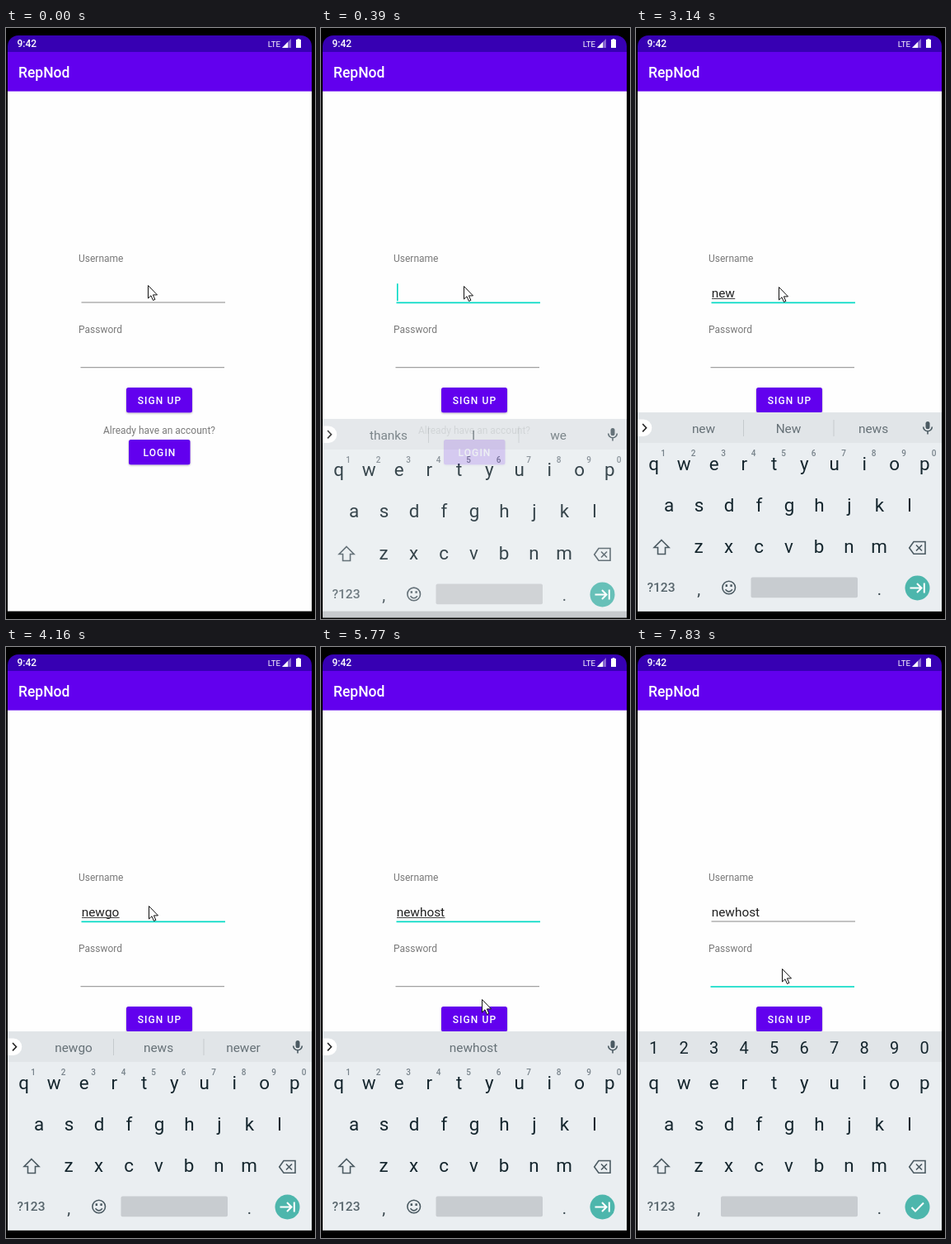
These frames come from a looping animation (375x715 px, 8 s). An HTML page:

```html
<!DOCTYPE html>
<html lang="en">
<head>
<meta charset="utf-8">
<title>Sign-up form</title>
<style>
  html, body { margin: 0; width: 100%; height: 100%; overflow: hidden; background: #000; }
  svg { display: block; width: 375px; height: 715px; font-family: Roboto, sans-serif; }
  .label { font-size: 12px; fill: #7a7a7a; }
  .button { font-size: 12px; font-weight: 500; letter-spacing: 1.1px; fill: #fff; }
  .field, .words { font-size: 15.4px; }
  .field { fill: #212121; }
  .words { fill: #667177; text-anchor: middle; }
  .key { font-size: 22.4px; fill: #15262e; text-anchor: middle; }
  .digit { font-size: 20px; }
  .mark { font-size: 20px; fill: #36454c; }
  .hint { font-size: 10px; font-weight: 500; fill: #77828a; text-anchor: middle; }
  .icon { fill: none; stroke: #4b5a62; stroke-width: 1.6; }
  .white { stroke: #fff; stroke-width: 2; }
</style>
</head>
<body>
<svg viewBox="0 0 375 715">
  <defs>
    <clipPath id="display"><rect x="2" y="9" width="369" height="705"/></clipPath>
    <filter id="shadow" x="-10%" y="-20%" width="120%" height="150%">
      <feDropShadow dx="0" dy="1" stdDeviation="1" flood-opacity=".3"/>
    </filter>
  </defs>

  <rect width="375" height="715"/>
  <rect x="2" y="40" width="369" height="665.6" fill="#fefefe"/>
  <path d="M2 30V22A13 13 0 0 1 15 9H358A13 13 0 0 1 371 22V30Z" fill="#3700b3"/>
  <rect x="2" y="29" width="369" height="47.6" fill="#6200ee"/>
  <g fill="#fff">
    <text x="13.5" y="23" font-size="12" font-weight="500">9:42</text>
    <text x="317.8" y="22.8" font-size="9.8">LTE</text>
    <path d="M346 13V24H335Z" opacity=".4"/>
    <path d="M342 17V24H335Z"/>
    <path d="M352 14H353.7V13H356.3V14H358V24H352Z"/>
    <text x="15" y="60" font-size="17.5" font-weight="500">RepNod</text>
  </g>

  <text class="label" x="88" y="282.7">Username</text>
  <text class="label" x="88" y="369.2">Password</text>
  <text class="label" x="118" y="490.5">Already have an account?</text>
  <g fill="#6200ee" filter="url(#shadow)">
    <rect x="146" y="435" width="80" height="30.3" rx="2.5"/>
    <rect x="149" y="498" width="74.5" height="30.3" rx="2.5"/>
  </g>
  <text class="button" x="159.7" y="454.6">SIGN UP</text>
  <text class="button" x="166.5" y="517.8">LOGIN</text>

  <rect id="userLine" x="91.5" width="174.5"/>
  <rect id="passLine" x="90.5" width="174.5"/>
  <text id="entry" class="field" x="91.7" y="326"></text>
  <rect id="composing" x="92" y="327" height="1" fill="#444"/>
  <rect id="caret" width="1.6" height="21" fill="#03dac5"/>

  <g clip-path="url(#display)">
    <g id="keyboard">
      <rect x="2" y="465" width="369" height="240.6" fill="#eaeef1"/>
      <rect x="2" y="465" width="369" height="37" fill="#e1e5e8"/>
      <g id="suggestions">
        <path d="M2 473.5H9A10.2 10.2 0 0 1 9 494H2Z" fill="#fff"/>
        <path class="icon" d="M8 479L12.5 483.7L8 488.4" style="stroke:#222"/>
        <path id="dividers" d="M130.5 474V494M240 474V494" stroke="#c5cacd"/>
        <text class="words" x="82" y="490"></text>
        <text class="words" x="185" y="490"></text>
        <text class="words" x="288" y="490"></text>
        <rect x="351.5" y="476" width="5" height="9.3" rx="2.5" fill="#4b5a62"/>
        <path class="icon" d="M348.7 482.5A5.3 5.3 0 0 0 359.3 482.5M354 488V491.5"/>
      </g>
      <g id="numbers"></g>
      <g id="hints"></g>
      <g id="keys"></g>
      <path class="icon" d="M31 619.5L40 628.5H35.5V636.5H26.5V628.5H22Z"/>
      <path class="icon" d="M337 621.5H351V636.3H337L331.7 629ZM340 625.5L347 632.5M347 625.5L340 632.5"/>
      <text x="30.5" y="682.3" font-size="15.5" font-weight="500" fill="#56646b" text-anchor="middle">?123</text>
      <g id="smiley">
        <circle class="icon" cx="112.7" cy="677" r="7.8"/>
        <path class="icon" d="M108.5 679.2Q112.7 684.5 116.9 679.2"/>
        <path d="M108.6 673.3h2.4v2.6h-2.4zM114.4 673.3h2.4v2.6h-2.4z" fill="#4b5a62"/>
      </g>
      <rect id="space" y="664.5" height="24.7" rx="2" fill="#c8ccd0"/>
      <circle cx="341.5" cy="677.5" r="15" fill="#4db6ac"/>
      <path id="action" class="icon white"/>
    </g>
  </g>
  <path id="mouse" d="M.5 .5V16L4 12.8L6.5 18.5L8.9 17.4L6.4 11.9H11.5Z" fill="#fff" stroke="#111"/>
</svg>
<script>
const LOOP = 8000;
const $ = id => document.getElementById(id);
const set = (id, attrs) => {
  for (const name in attrs) $(id).setAttribute(name, attrs[name]);
};
const show = (id, on) => $(id).style.display = on ? '' : 'none';
const words = document.querySelectorAll('.words');

// Each step keeps the values of the one before it, except those it names.
const changes = [
  [0, { mouse: [172, 311], focus: '', caret: 0, text: '', composing: 0,
        keyboard: 0, words: ['thanks', 'I', 'we'], password: 0 }],
  [150, { mouse: [173, 312], focus: 'user', caret: 1 }],
  [270, { keyboard: .4 }],
  [390, { keyboard: .85 }],
  [510, { keyboard: 1 }],
  [790, { caret: 0 }],
  [1220, { caret: 1, mouse: [173, 313] }],
  [1780, { caret: 0 }],
  [2150, { caret: 1, text: 'ne', composing: 1, words: ['ne', 'Ne', 'new'] }],
  [2580, { text: 'new', words: ['new', 'New', 'news'] }],
  [3140, { caret: 0 }],
  [3290, { caret: 1, text: 'newg', words: ['newg', 'new', 'news'] }],
  [3570, { text: 'newgo', words: ['newgo', 'news', 'newer'] }],
  [4160, { caret: 0 }],
  [4280, { caret: 1, text: 'newg', words: ['newg', 'new', 'news'] }],
  [4400, { text: 'new', words: ['new', 'New', 'news'] }],
  [4800, { text: 'newh', words: ['newh', 'news', 'new'] }],
  [4950, { text: 'newho', words: ['newho', 'news', 'newer'] }],
  [5070, { text: 'newhos', words: ['newhos', 'news', 'newhost'] }],
  [5380, { text: 'newhost', words: ['', 'newhost', ''] }],
  [5530, { mouse: [177, 335] }],
  [5650, { mouse: [190, 396] }],
  [5770, { mouse: [195, 426], caret: 0 }],
  [5890, { mouse: [186, 404] }],
  [6040, { mouse: [184, 392] }],
  [6190, { mouse: [177, 389], focus: 'pass', caret: 1, composing: 0 }],
  [6310, { password: 1 }],
  [6740, { caret: 0 }],
  [7270, { caret: 1 }],
  [7830, { caret: 0 }]
];
let merged = {};
const steps = changes.map(([time, change]) => ({ time, ...(merged = { ...merged, ...change }) }));

const keyText = (x, y, char, style = 'key') => `<text class="${style}" x="${x}" y="${y}">${char}</text>`;
const keyRow = (chars, x, y, style) =>
  [...chars].map((char, i) => keyText(x + i * 36.5, y, char, style)).join('');

$('keys').innerHTML =
  keyRow('qwertyuiop', 21.7, 534.5) + keyRow('asdfghjkl', 40, 584.5) + keyRow('zxcvbnm', 76, 635) +
  keyText(76.3, 685.5, ',', 'key mark') + keyText(295.3, 685.5, '.', 'key mark');
$('hints').innerHTML = keyRow('1234567890', 33, 518, 'hint');
$('numbers').innerHTML = keyRow('1234567890', 21.5, 491.7, 'key digit');

function render(state) {
  const onUser = state.focus === 'user', onPass = state.focus === 'pass';
  set('userLine', { y: 331.5, height: onUser ? 1.7 : 1, fill: onUser ? '#03dac5' : '#8a8a8a' });
  set('passLine', { y: 410.2, height: onPass ? 1.6 : 1, fill: onPass ? '#03dac5' : '#8a8a8a' });

  $('entry').textContent = state.text;
  const width = state.text ? $('entry').getComputedTextLength() : 0;
  set('composing', { width: state.composing ? width : 0 });
  set('caret', { x: onPass ? 90.3 : 92 + width, y: onPass ? 387.5 : 309.2 });
  show('caret', state.caret);

  const { keyboard, password } = state;
  set('keyboard', { opacity: keyboard, transform: `translate(0 ${(1 - keyboard) * 53})` });
  words.forEach((word, i) => word.textContent = state.words[i]);
  for (const id of ['suggestions', 'hints', 'smiley']) show(id, !password);
  show('numbers', password);
  show('dividers', state.words[0]);
  const left = password ? 103 : 139.5;
  set('space', { x: left, width: 269 - left });
  set('action', { d: password
    ? 'M334.5 678L339 682.5L349 672.5'
    : 'M332.5 677.5H346M341 672L346.5 677.5L341 683M349.8 671.5V683.5' });
  set('mouse', { transform: `translate(${state.mouse})` });
}

let current;
function tick() {
  const time = performance.now() % LOOP;
  const step = steps.findLast(s => s.time <= time);
  if (step !== current) render(current = step);
  requestAnimationFrame(tick);
}
tick();
</script>
</body>
</html>
```
